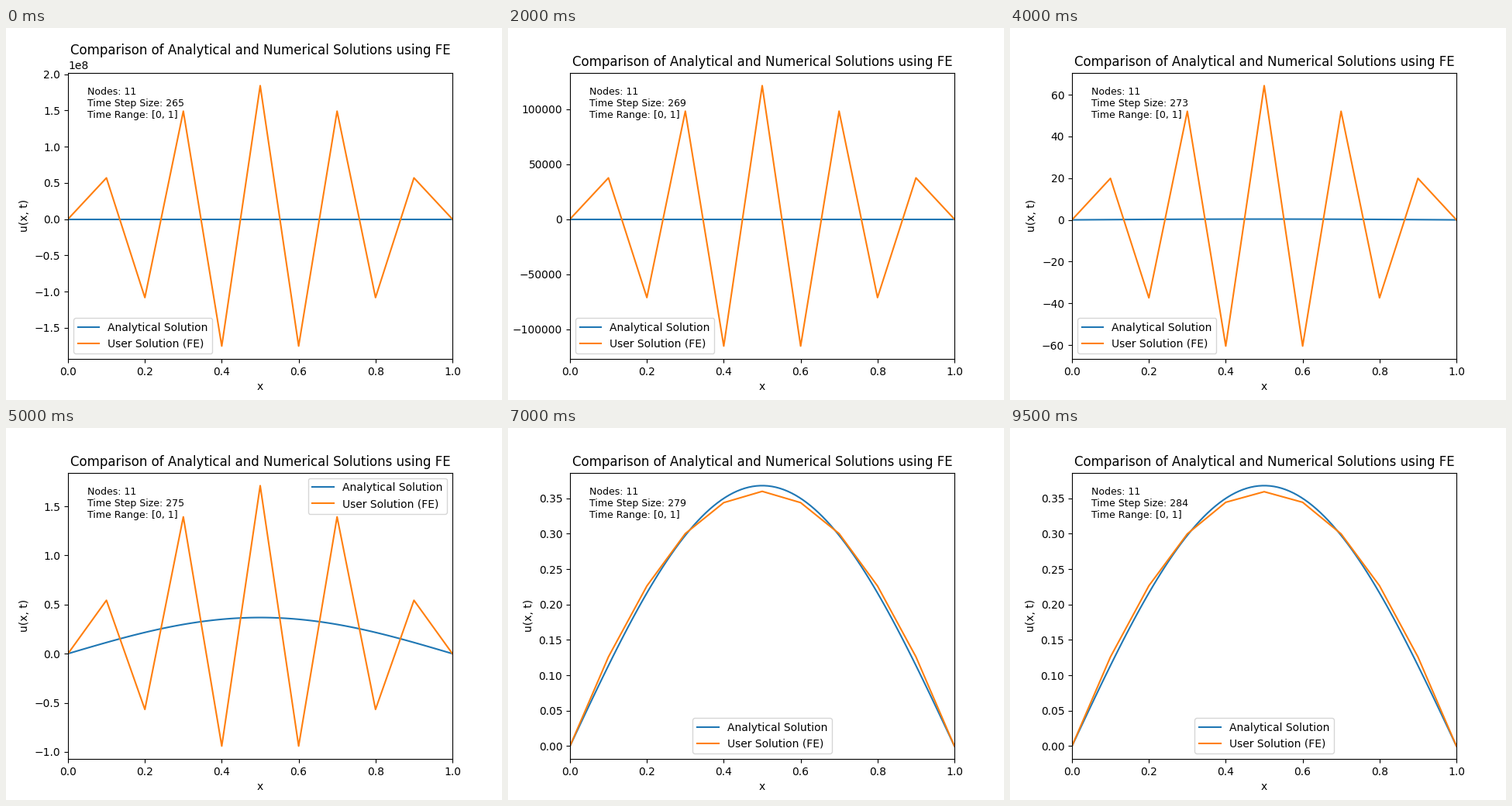
Recreate the animation shown at these times as a matplotlib script. Size 640 px wide and 480 px high, loop 10000 ms.

```python
import numpy as np
import matplotlib.pyplot as plt
from matplotlib.animation import FuncAnimation

NODES = 11
FIRST_STEPS = 265
FRAMES = 20
LOAD = 6.21  # uniform load amplitude, decaying as exp(-t)

h = 1 / (NODES - 1)
x_nodes = np.linspace(0, 1, NODES)
x_fine = np.linspace(0, 1, 100)


def tridiagonal(diagonal, off):
    n = NODES - 2
    return diagonal * np.eye(n) + off * (np.eye(n, k=1) + np.eye(n, k=-1))


mass = 2 * h / 6 * tridiagonal(4, 1)
stiffness = tridiagonal(2, -1) / h
system = np.linalg.solve(mass, stiffness)
forcing = np.linalg.solve(mass, np.full(NODES - 2, LOAD * h))


def forward_euler(steps):
    """Integrate the interior nodes from t = 0 to t = 1."""
    dt = 1 / steps
    u = np.sin(np.pi * x_nodes[1:-1])
    for k in range(steps):
        u = u + dt * (forcing * np.exp(-k * dt) - system @ u)
    return np.pad(u, 1)


fig, ax = plt.subplots(figsize=(6.4, 4.8), dpi=100)


def draw(frame):
    steps = FIRST_STEPS + frame
    ax.clear()
    ax.plot(x_fine, np.exp(-1) * np.sin(np.pi * x_fine),
            label="Analytical Solution")
    ax.plot(x_nodes, forward_euler(steps), label="User Solution (FE)")
    ax.set_xlim(0, 1)
    ax.set_xlabel("x")
    ax.set_ylabel("u(x, t)")
    ax.set_title("Comparison of Analytical and Numerical Solutions using FE")
    ax.legend(loc="best")
    ax.text(0.05, 0.95,
            f"Nodes: {NODES}\nTime Step Size: {steps}\nTime Range: [0, 1]",
            transform=ax.transAxes, fontsize=9, va="top")


anim = FuncAnimation(fig, draw, frames=FRAMES, interval=500,
                     repeat=True, repeat_delay=0)
plt.show()
```
